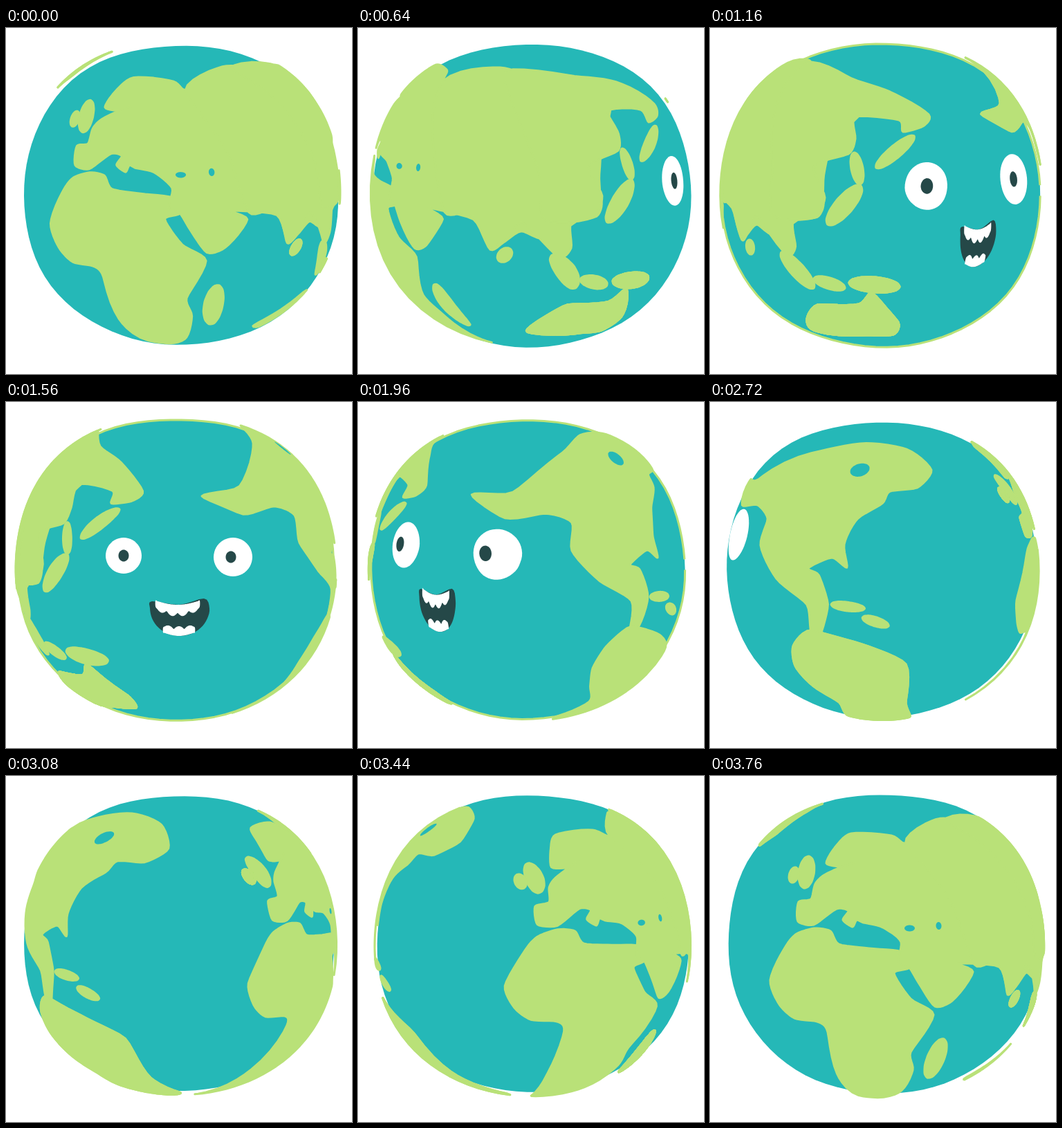
An HTML page with a canvas that plays this animation: 500 px wide and 500 px high, repeating every 3800 ms.

```html
<!DOCTYPE html>
<html lang="en">
<head>
<meta charset="utf-8">
<title>Spinning globe</title>
<style>
  html, body { margin: 0; width: 100%; height: 100%; overflow: hidden; background: #fff; }
  canvas { display: block; }
</style>
</head>
<body>
<canvas width="500" height="500"></canvas>
<script>
const ctx = document.querySelector('canvas').getContext('2d');
const OCEAN = '#25b8b7', LAND = '#b9e178', DARK = '#254848', WHITE = '#fff';
const { PI, sin, cos, hypot, atan2 } = Math;
const LOOP = 3800, STEP = 40, STEPS = LOOP / STEP, TILT = 8 * PI / 180, RELIEF = 1.013;
const FACE_STEP = 39; // the face looks straight ahead here

// Steady spin with a late hurry, a gentle sway, and land that slowly sinks
function poseAt(step) {
  const t = step / STEPS, sway = sin(2 * PI * t);
  return {
    angle: (3.6 * step + 14 * t ** 10) * PI / 180,
    cx: 249 + 4 * cos(2 * PI * t),
    cy: 242.5,
    rx: 227 + 3 * sway,
    ry: 216 + 3 * sway,
    sink: 9 * t - 5
  };
}

const turn = (a, b, angle) => [a * cos(angle) - b * sin(angle), a * sin(angle) + b * cos(angle)];

// The outline is slightly squarer than an ellipse, more so at the top
function bulge(x, y) {
  const r = hypot(x, y) || 1;
  return 1 + .03 * (2 * x * y / r ** 2) ** 2 * (1 - .5 * y / r);
}

function toScreen(x, y, pose) {
  const k = RELIEF * bulge(x, y);
  return [pose.cx + x * k * pose.rx, pose.cy + pose.sink + y * k * pose.ry];
}

// Screen point in a pose -> unit vector on the globe
function toGlobe([px, py], pose) {
  let x = (px - pose.cx) / pose.rx, y = (py - pose.cy - pose.sink) / pose.ry;
  const k = RELIEF * bulge(x, y), r = Math.max(k, hypot(x, y));
  x /= r; y /= r;
  let z = Math.sqrt(Math.max(0, 1 - x * x - y * y));
  [z, y] = turn(z, y, -TILT);
  [x, z] = turn(x, z, -pose.angle);
  return [x, y, z];
}

function toView([x, y, z], pose) {
  [x, z] = turn(x, z, pose.angle);
  [z, y] = turn(z, y, TILT);
  return [x, y, z];
}

// Closed smooth curve through points on the sphere
function smooth(points, parts = 6, tension = .35) {
  const n = points.length, out = [];
  points.forEach((p, i) => {
    const before = points[(i + n - 1) % n], q = points[(i + 1) % n], after = points[(i + 2) % n];
    for (let j = 0; j < parts; j++) {
      const t = j / parts, t2 = t * t, t3 = t2 * t;
      const v = p.map((c, d) =>
        (2 * t3 - 3 * t2 + 1) * c + (3 * t2 - 2 * t3) * q[d] +
        tension * ((t3 - 2 * t2 + t) * (q[d] - before[d]) + (t3 - t2) * (after[d] - c)));
      const len = hypot(...v);
      out.push(v.map(c => c / len));
    }
  });
  return out;
}

const oval = (x, y, rx, ry, angle = 0) => Array.from({ length: 12 }, (_, i) => {
  const [dx, dy] = turn(rx * cos(i * PI / 6), ry * sin(i * PI / 6), angle);
  return [x + dx, y + dy];
});

// Shapes are placed as they look at a given step
const shape = (step, points, color = LAND) =>
  ({ color, curve: smooth(points.map(p => toGlobe(p, poseAt(step)))) });

const coast = (step, text) =>
  shape(step, text.trim().split(/\s+/).map(pair => pair.split(',').map(Number)));

const island = (step, x1, y1, x2, y2, width, color) =>
  shape(step, oval((x1 + x2) / 2, (y1 + y2) / 2,
    hypot(x2 - x1, y2 - y1) / 2, width / 2, atan2(y2 - y1, x2 - x1)), color);

const africa = coast(94, `151,220 174,224 186,243 230,249 277,254 288,277 266,285 290,322
  323,345 290,399 293,425 272,458 228,464 187,437 170,370 155,355 122,350 100,330 87,295
  110,245 125,228`);
const europe = coast(94, `127,210 128,182 146,178 152,156 165,143 209,125 190,131 168,126
  183,100 204,83 262,86 280,97 300,90 355,61 398,62 445,112 480,190 490,230 470,290 457,284
  443,303 430,316 418,276 357,271 380,283 350,325 325,333 302,300 288,277 272,268 276,240
  250,219 222,212 212,208 206,218 192,208 200,195 183,192 150,215`);
const asia = coast(16, `125,75 205,57 245,67 335,77 365,100 357,150 334,203 352,250 345,272
  308,282 308,318 290,331 238,281 215,305 190,315 172,280 155,267 125,266 110,180`);
const siberia = coast(29, `140,50 205,73 260,92 316,125 308,142 279,150 273,133 210,128
  210,160 200,182 150,200 166,245 148,275 90,270 90,200 100,100`);
const northAmerica = coast(60, `74,124 112,121 213,77 270,58 330,60 378,88 376,114 345,120
  342,138 316,165 305,205 309,238 287,225 250,243 268,252 284,293 268,335 253,335 250,295
  195,262 158,215 164,175 135,157 90,160`);
const southAmerica = coast(60, `253,331 325,349 373,375 340,432 310,453 270,461 235,455
  250,435 225,412 210,385 218,355`);
const australia = coast(29, `140,420 155,400 215,399 235,383 272,425 265,443 225,444 150,437`);

const map = [
  africa, europe, asia, siberia, northAmerica, southAmerica, australia,
  island(94, 143, 116, 136, 162, 22), // Britain
  island(94, 124, 132, 118, 154, 13), // Ireland
  island(94, 338, 380, 314, 436, 24), // Madagascar
  island(16, 203, 336, 221, 320, 18), // Sri Lanka
  island(29, 240, 202, 295, 156, 18), // Japan
  island(29, 208, 180, 217, 226, 17), // Taiwan
  island(29, 218, 228, 170, 284, 26), // Philippines
  island(29, 103, 324, 150, 376, 20), // Sumatra
  island(29, 150, 362, 195, 376, 16), // Java
  island(29, 201, 368, 274, 374, 22), // New Guinea
  island(60, 289, 293, 336, 296, 13), // Cuba
  island(60, 332, 310, 365, 320, 14), // Hispaniola
  island(94, 281, 220, 296, 220, 9, OCEAN), // Black Sea
  island(94, 330, 211, 331, 222, 8, OCEAN), // Caspian Sea
  island(60, 276, 98, 302, 94, 20, OCEAN) // Hudson Bay
];

// Fills the visible part of a curve, following the rim where it goes behind
function fillCurve(curve, pose, color) {
  const pts = curve.map(p => toView(p, pose));
  const first = pts.findIndex(p => p[2] >= 0);
  if (first < 0) return;
  const line = (x, y) => ctx.lineTo(...toScreen(x, y, pose));
  let last = pts[first], hidden = false;
  ctx.beginPath();
  for (let i = 0; i <= pts.length; i++) {
    const p = pts[(first + i) % pts.length];
    if (p[2] < 0) { hidden = true; continue; }
    if (hidden) {
      const from = atan2(last[1], last[0]);
      let sweep = atan2(p[1], p[0]) - from;
      sweep -= 2 * PI * Math.round(sweep / (2 * PI));
      for (let j = 0; j <= 16; j++) line(cos(from + sweep * j / 16), sin(from + sweep * j / 16));
    }
    line(p[0], p[1]);
    last = p;
    hidden = false;
  }
  ctx.closePath();
  ctx.fillStyle = color;
  ctx.fill();
}

function drawOcean(pose, step) {
  ctx.beginPath();
  for (let i = 0; i < 90; i++) {
    const a = i / 45 * PI, x = cos(a), y = sin(a);
    const r = bulge(x, y) + .003 * sin(3 * a + step * 1.7) + .002 * sin(8 * a - step * 2.3);
    ctx.lineTo(pose.cx + pose.rx * r * x, pose.cy + pose.ry * r * y);
  }
  ctx.fillStyle = OCEAN;
  ctx.fill();
}

function drawMap(pose) {
  ctx.lineJoin = 'round';
  ctx.lineWidth = 3;
  ctx.strokeStyle = LAND;
  for (const { curve, color } of map) {
    fillCurve(curve, pose, color);
    if (color === LAND) ctx.stroke();
  }
}

// A row of teeth: a sagging gum line and a scalloped edge on one side of it
function teeth(x1, x2, y, sag, height, bumps) {
  const n = bumps * 6, gum = [], edge = [];
  for (let i = 0; i <= n; i++) {
    const u = i / n, x = x1 + (x2 - x1) * u, gumY = y + sag * sin(PI * u);
    gum.push([x, gumY]);
    edge.unshift([x, gumY + height * (.5 + .2 * sin(PI * u) + .3 * Math.abs(sin(bumps * PI * u)))]);
  }
  return [...gum, ...edge];
}

const mouth = [
  ...Array.from({ length: 9 }, (_, i) => [251 + 43 * cos(i * PI / 8), 298 + 40 * sin(i * PI / 8)]),
  [211, 288], [250, 293], [286, 284]
];
const upperTeeth = teeth(216, 280, 287, 6, 17, 4);
const lowerTeeth = teeth(227, 273, 333, 5, -14, 3);

function drawFace(pose, step) {
  const front = poseAt(FACE_STEP), away = step - FACE_STEP;
  const smile = Math.exp(-((away / 8) ** 2));
  const drop = -.7 * away, trail = Math.max(0, 1.2 * away);
  const part = (points, [ox, oy], wide, tall, color, dx = 0) => {
    const place = ([x, y]) =>
      toGlobe([ox + (x - ox) * wide + dx, oy + (y - oy) * tall + drop], front);
    if (toView(place([ox, oy]), pose)[2] > .15)
      fillCurve(smooth(points.map(place), 4, .5), pose, color);
  };
  const eye = (x, y, r, pupilX) => {
    const wide = 1.2 - .2 * smile, tall = 1.4 - .4 * smile;
    part(oval(x, y, r, r), [x, y], wide, tall, WHITE, trail);
    part(oval(pupilX, y, 7.5, 8.5), [pupilX, y], wide, tall, DARK);
  };
  eye(170, 222, 26, 170);
  eye(328, 224, 28, 325);
  for (const [points, color] of [[mouth, DARK], [upperTeeth, WHITE], [lowerTeeth, WHITE]])
    part(points, [251, 310], .7 + .3 * smile, 1.2 - .2 * smile, color);
}

function draw() {
  const step = Math.floor(performance.now() % LOOP / STEP), pose = poseAt(step);
  ctx.fillStyle = WHITE;
  ctx.fillRect(0, 0, 500, 500);
  drawOcean(pose, step);
  drawMap(pose);
  drawFace(pose, step);
  requestAnimationFrame(draw);
}
draw();
</script>
</body>
</html>
```
